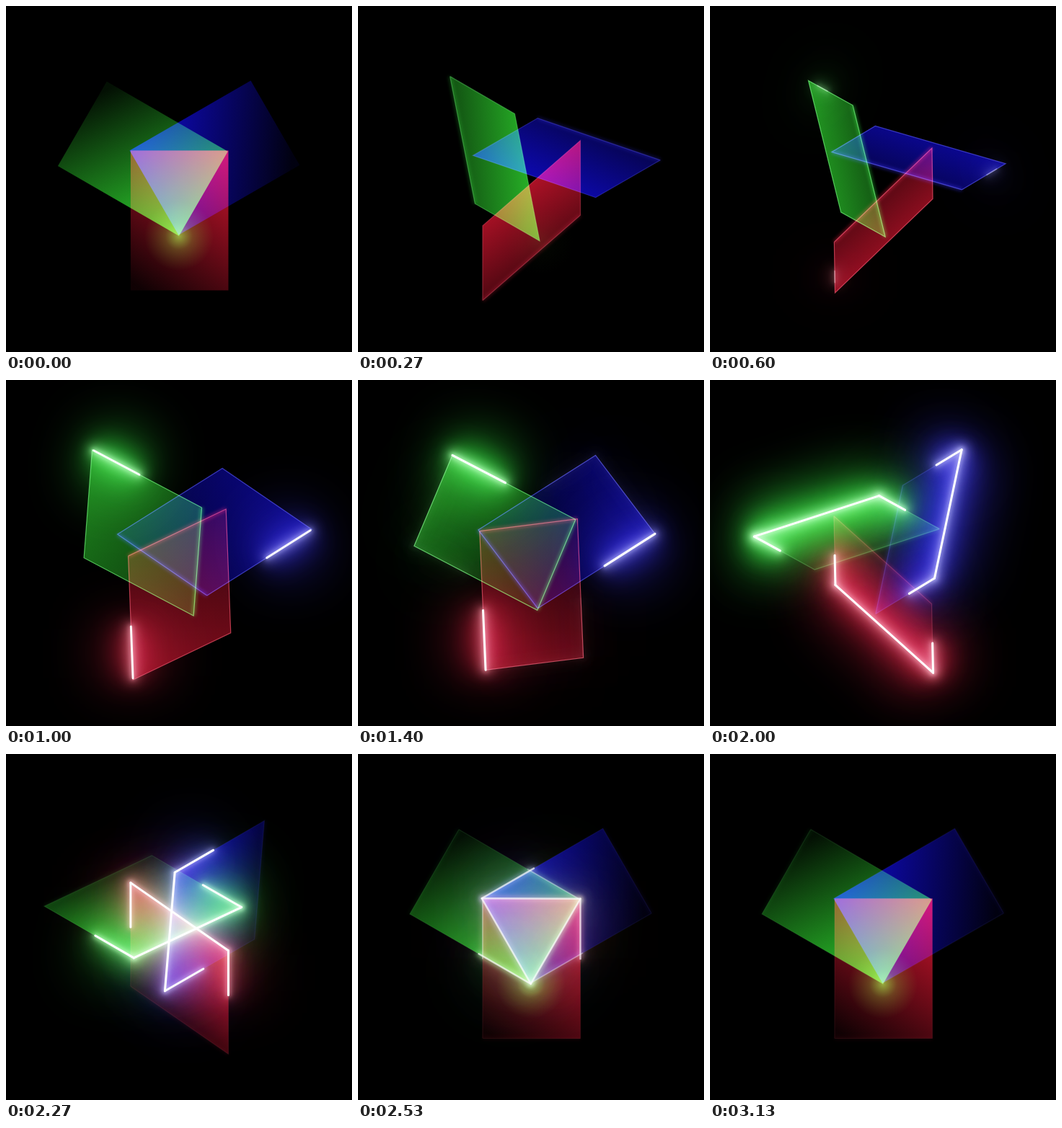
These frames come from a looping animation (480x480 px, 3.19 s). An HTML page with a canvas:

```html
<!DOCTYPE html>
<html>
<head>
<meta charset="utf-8">
<style>
  html, body { margin: 0; height: 100%; overflow: hidden; background: #000; }
  canvas { display: block; }
</style>
</head>
<body>
<canvas width="480" height="480"></canvas>
<script>
const ctx = document.querySelector('canvas').getContext('2d');
const LOOP = 3190, FPS = 15;

const sheets = [
  { fill: '205,20,45', edge: '235,75,95', glow: '215,30,58', pale: '255,135,150', power: 0.9 },
  { fill: '45,205,45', edge: '100,245,110', glow: '45,215,55', pale: '140,255,145', power: 1.2 },
  { fill: '15,10,205', edge: '75,75,240', glow: '50,45,235', pale: '145,145,255', power: 0.9 }
];

const ramp = (from, to, t) => {
  const x = Math.min(1, Math.max(0, (t - from) / (to - from)));
  return x * x * (3 - 2 * x);
};

// Half a turn that slows down, then half a turn that speeds up and stops.
function angleAt(t) {
  const slowing = 1 - Math.max(0, 1 - t / 2) ** 2.7;
  return Math.PI * (1 - slowing - ramp(1.65, 2.55, t));
}

function lightAt(t) {
  const on = ramp(0.3, 1.1, t);
  const second = ramp(1.3, 2, t) * (1 - ramp(2.4, 2.75, t));
  return {
    left: on * (1 - ramp(2.2, 2.75, t)),
    bottom: second,
    right: second,
    start: 0.3 * (1 - on),
    halo: 1 - 0.75 * ramp(2, 2.5, t),
    edge: 0.7 * ramp(0, 0.5, t) * (1 - 0.85 * ramp(1.5, 2.3, t))
  };
}

function stroke(points, color, width, blur = 0, cap = 'butt') {
  ctx.filter = blur ? `blur(${blur}px)` : 'none';
  ctx.strokeStyle = color;
  ctx.lineWidth = width;
  ctx.lineCap = cap;
  ctx.beginPath();
  points.forEach(p => ctx.lineTo(...p));
  ctx.stroke();
  ctx.filter = 'none';
}

function neon(a, b, power, sheet, halo) {
  if (power < 0.02) return;
  const line = [a, b];
  const tint = (color, alpha) =>
    `rgba(${color},${Math.min(1, alpha * power * sheet.power)})`;
  stroke(line, tint(sheet.glow, 0.55 * halo), 80, 38);
  stroke(line, tint(sheet.glow, 0.65 * halo), 36, 17);
  stroke(line, tint(sheet.pale, 0.7 * halo), 13, 8, 'round');
  stroke(line, tint(sheet.pale, 0.8), 6, 3, 'round');
  stroke(line, `rgba(255,255,255,${power})`, 1.2 + 1.8 * power, 0.7, 'round');
}

function drawSheet(sheet, angle, light) {
  const c = Math.cos(angle), s = Math.sin(angle);
  const skew = 4.2 * Math.max(0, c) ** 2;
  // x and y run from -1 to 1 across the square
  const matrix = [67.8, -70 * s, skew, 97 * c, 0.7, 57.5];
  const at = (x, y) => [0, 1].map(i => matrix[i] * x + matrix[i + 2] * y + matrix[i + 4]);
  const corners = [at(-1, -1), at(1, -1), at(1, 1), at(-1, 1)];

  ctx.save();
  ctx.transform(...matrix);
  const dx = -0.15 * c, dy = 0.31, k = 0.42 / (dx * dx + dy * dy);
  const grad = ctx.createLinearGradient(-dx * k, -dy * k, dx * k, dy * k);
  grad.addColorStop(0, `rgba(${sheet.fill},${0.08 + 0.35 * Math.max(0, s)})`);
  grad.addColorStop(1, `rgba(${sheet.fill},${0.8 - 0.2 * c})`);
  ctx.fillStyle = grad;
  ctx.fillRect(-1, -1, 2, 2);
  ctx.restore();

  stroke([...corners, corners[0]], `rgba(${sheet.edge},${light.edge})`, 1.2);
  stroke(corners.slice(0, 2), `rgba(${sheet.glow},${light.edge * 0.6})`, 5, 2);

  const reach = 1 - 2 * 0.43;
  neon(at(-1, 1 - 2 * light.start), at(-1, reach), light.left, sheet, light.halo);
  neon(at(-1, 1), at(1, 1), light.bottom, sheet, light.halo);
  neon(at(1, 1), at(1, reach), light.right, sheet, light.halo);

  return corners[2];
}

function drawSpot([x, y], power) {
  const r = 48, grad = ctx.createRadialGradient(x, y, 0, x, y, r);
  grad.addColorStop(0, `rgba(120,225,60,${power})`);
  grad.addColorStop(0.4, `rgba(90,190,40,${power * 0.4})`);
  grad.addColorStop(1, 'rgba(60,150,30,0)');
  ctx.fillStyle = grad;
  ctx.fillRect(x - r, y - r, 2 * r, 2 * r);
}

function draw(t) {
  const light = lightAt(t), angle = angleAt(t);
  ctx.setTransform(1, 0, 0, 1, 0, 0);
  ctx.globalCompositeOperation = 'source-over';
  ctx.fillStyle = '#000';
  ctx.fillRect(0, 0, 480, 480);
  ctx.globalCompositeOperation = 'screen';
  ctx.translate(240, 240);
  sheets.forEach((sheet, i) => {
    ctx.save();
    ctx.rotate(i * 2 * Math.PI / 3);
    const corner = drawSheet(sheet, angle, light);
    if (i === 1) drawSpot(corner, 0.75 * Math.max(0, -Math.cos(angle)) ** 4);
    ctx.restore();
  });
}

let shown = -1;
const begin = performance.now();
function tick() {
  const ms = (performance.now() - begin) % LOOP;
  const step = Math.floor((ms + 4) * FPS / 1000);
  if (step !== shown) draw((shown = step) / FPS);
  requestAnimationFrame(tick);
}
tick();
</script>
</body>
</html>
```
